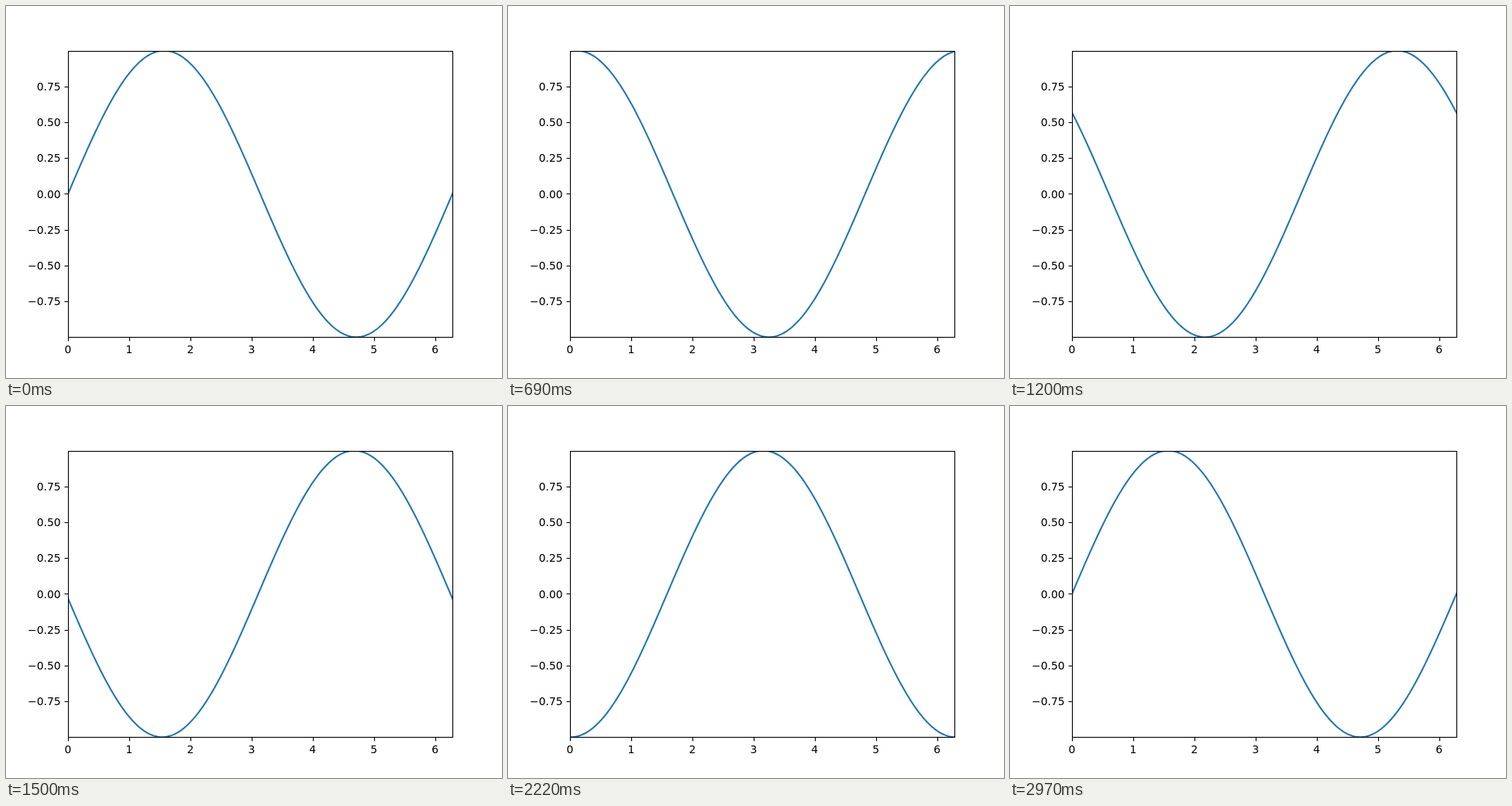
Animation of 640 by 480 pixels, one loop 3000 ms. Source, as an HTML page:

```html
<!DOCTYPE html>
<html lang="en">
<head>
<meta charset="utf-8">
<title>Travelling sine wave</title>
<style>
  html, body { margin: 0; width: 100%; height: 100%; overflow: hidden; background: #fff; }
  svg { display: block; width: 640px; height: 480px; }
  text { font: 13.889px "DejaVu Sans", sans-serif; fill: #000; }
  .axis { fill: none; stroke: #000; stroke-width: 1.11; }
  #wave { fill: none; stroke: #1f77b4; stroke-width: 2.083; stroke-linejoin: round; }
</style>
</head>
<body>
<svg viewBox="0 0 640 480">
  <clipPath id="plot"><rect x="80" y="58" width="496" height="369"/></clipPath>
  <g clip-path="url(#plot)"><path id="wave"/></g>
  <g id="ticks"></g>
  <rect class="axis" x="80.5" y="58.5" width="496" height="369"/>
</svg>
<script>
  const NS = 'http://www.w3.org/2000/svg';
  const TAU = 2 * Math.PI;
  const STEP_MS = 30, STEPS = 100;
  const ticks = document.getElementById('ticks');
  const wave = document.getElementById('wave');

  const toX = v => 80 + 496 * v / TAU;
  const toY = v => 242.4 - 184.81 * v;
  const snap = v => Math.round(v) + 0.5;

  function add(tag, attrs, text = '') {
    const el = document.createElementNS(NS, tag);
    for (const key in attrs) el.setAttribute(key, attrs[key]);
    el.textContent = text;
    ticks.append(el);
  }

  for (let v = 0; v <= 6; v++) {
    const x = toX(v);
    add('path', { class: 'axis', d: `M${snap(x)} 427.5v5` });
    add('text', { x, y: 448, 'text-anchor': 'middle' }, v);
  }

  for (let i = -3; i <= 3; i++) {
    const v = i / 4, y = toY(v);
    const label = v.toFixed(2).replace('-', '\u2212');
    add('path', { class: 'axis', d: `M80.5 ${snap(y)}h-5` });
    add('text', { x: 70.6, y: Math.round(y + 5.28), 'text-anchor': 'end' }, label);
  }

  // Both ends of the loop share a phase, so the last step equals the first.
  function draw(step) {
    const phase = TAU * step / (STEPS - 1);
    const points = [];
    for (let x = 78; x <= 578; x += 2) {
      const angle = (x - 80) / 496 * TAU;
      points.push(`${x} ${toY(Math.sin(angle + phase)).toFixed(3)}`);
    }
    wave.setAttribute('d', 'M' + points.join('L'));
  }

  const start = performance.now();
  let shown = 0;
  function tick() {
    const time = Math.max(0, performance.now() - start);
    const step = Math.floor(time / STEP_MS) % STEPS;
    if (step !== shown) draw(shown = step);
    requestAnimationFrame(tick);
  }
  draw(0);
  requestAnimationFrame(tick);
</script>
</body>
</html>
```
